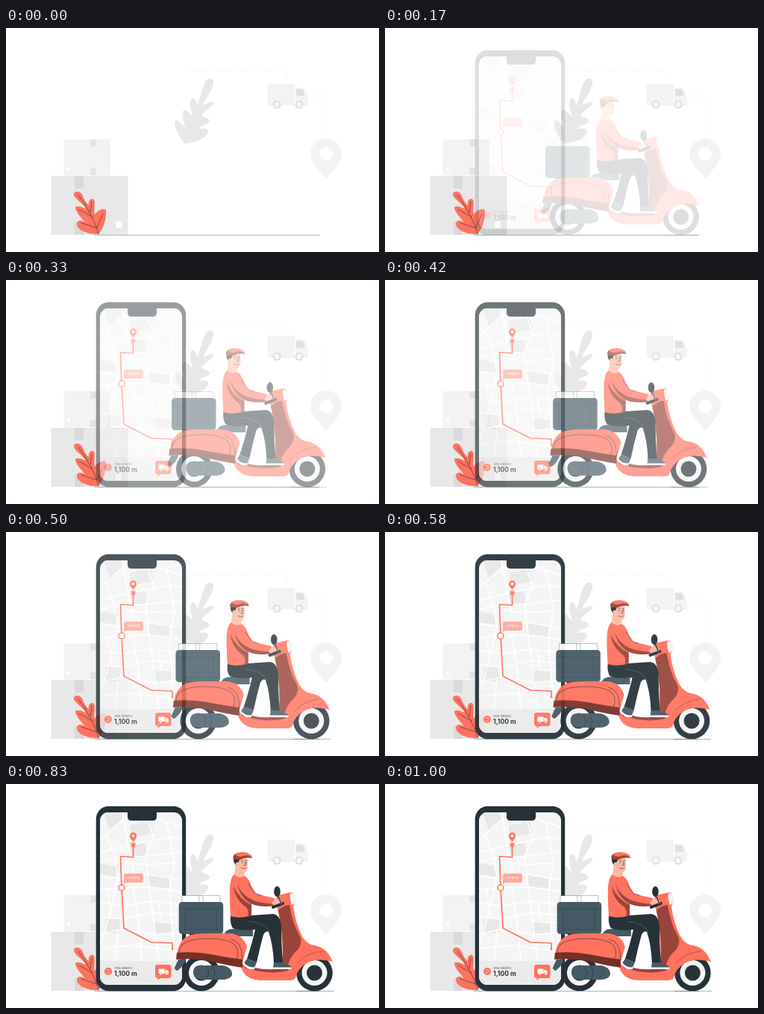
An HTML page that plays this animation: 500x300 px, repeating every 1040 ms.

```html
<!DOCTYPE html>
<html lang="en">
<head>
<meta charset="utf-8">
<title>Delivery scooter</title>
<style>
  html, body { margin: 0; width: 100%; height: 100%; overflow: hidden; background: #fff; }
  svg { display: block; width: 500px; height: 300px; }
  text { font-family: Inter, "Open Sans", sans-serif; }
  .red { fill: #ff725e; }
  .shade { fill: #99443a; }
  .dark { fill: #263238; }
  .slate { fill: #455a64; }
  .skin { fill: #ffb9a3; }
  .white { fill: #fff; }
  .line { fill: none; stroke: #263238; stroke-width: .6; stroke-linecap: round; }
  .road { fill: none; stroke: #fff; stroke-width: 1.7; }
</style>
</head>
<body>
<svg viewBox="0 0 500 300">
  <defs>
    <clipPath id="screen"><rect x="126" y="38" width="110" height="231" rx="11"/></clipPath>
    <g id="wheel">
      <circle r="24.3" class="dark"/>
      <circle r="17" fill="#f5f5f5"/>
      <circle r="10.5" class="dark"/>
    </g>
    <g id="tyre">
      <circle r="5.6" fill="#e0e0e0"/>
      <circle r="3.4" fill="#f7f7f7"/>
    </g>
  </defs>

  <!-- backdrop -->
  <path fill="none" stroke="#f4f4f4" stroke-dasharray="4 4" d="M242 57.500H377V72M408 91H428V146"/>
  <path fill="#e8e8e8" d="M240 155C232 146 224 130 227 124C231 121 236 130 241 133C237 124 234 112 239 110C244 109 247 116 251 119C247 109 245 95 250 94C254 93 255 99 257 103C261 93 264 72 271 68C277 66 280 70 277 78C274 88 266 96 264 104C268 101 276 97 278 100C280 104 266 110 262 118C266 120 273 121 273 125C272 130 262 129 258 135C264 134 272 134 271 139C268 149 254 153 240 155Z"/>
  <g fill="#f3f3f3">
    <path d="M350.500 74.500H387V104H350.500ZM388 80H398Q401 81 402 86L405 91V104H388Z"/>
    <path fill="#e0e0e0" d="M389 82H397Q400 84 400 91H391Q389 90 389 88Z"/>
    <use href="#tyre" x="363" y="102.500"/>
    <use href="#tyre" x="393" y="102.500"/>
    <path fill-rule="evenodd" d="M429 202C423 193 408 181 408 169A21 21 0 0 1 450 169C450 181 436 193 429 202ZM420 169a9 9 0 0 0 18 0a9 9 0 0 0-18 0"/>
    <rect x="77.500" y="149" width="62.500" height="48.500"/>
  </g>
  <path fill="#e4e4e4" d="M113 149h8v10h-8ZM113 187h8v10h-8Z"/>
  <rect x="82" y="186" width="4" height="5" class="white"/>
  <rect x="60.500" y="198" width="103" height="79" fill="#e8e8e8"/>
  <path fill="#dadada" d="M92 198h12v17H92ZM92 260h12v17H92Z"/>
  <rect x="147" y="259" width="8" height="9" class="white"/>
  <path class="line" stroke-opacity=".65" d="M119 277.400H420"/>
  <path class="red" d="M124 276C111 277 95 271 95 262C95 257 101 257 106 260C101 255 92 244 93 240C95 237 102 240 107 242C103 234 90 228 91 222C92 218 99 218 102 223C104 227 105 232 111 237C110 232 113 228 117 229C121 232 117 243 119 250C122 245 130 240 134 244C135 254 131 268 124 276Z"/>
  <path class="line" d="M124 276C121 262 108 238 97 224M122 268L101 261M116 253L98 243M122 267L130 249M113 247L115 233"/>

  <g id="phone">
    <rect x="120.700" y="29.700" width="120.500" height="247.600" rx="17" class="dark"/>
    <g clip-path="url(#screen)">
      <path fill="#f5f5f5" d="M126 38h110v231H126Z"/>
      <path fill="#e8e8e8" d="M131 38H155L156 48L140 65ZM166 55L194 50L198 66L168 72ZM190 122L219 126V140L192 137ZM134 178L152 181L153 200L131 199ZM196 186L222 184V200L199 201ZM164 83L186 79L190 95L171 98ZM126 106L148 111V124L126 121Z"/>
      <path class="road" d="M126 75L156 48L204 47L236 58M156 38L164 82L171 116M126 92L164 82L219 71L236 74M126 104L153 98L187 97L236 91M190 49L198 72L187 97L192 137L196 168M215 50L220 72L226 106L219 142L224 210M126 123L155 127L190 121L236 129M126 141L155 139L192 138L236 144M135 68L146 100L150 127L132 200L126 214M126 159L156 163L196 157L236 162M126 178L157 181L196 172L236 176M170 138L177 180L182 237M126 201L158 194L199 202L236 198M196 168L200 202L205 237M126 220L171 216L236 224M150 195L147 237M205 160L208 185L236 186M136 141L141 176M160 105L187 108L226 106"/>
      <path fill="#ebebeb" d="M126 237h110v33H126Z"/>
    </g>
    <path class="dark" d="M163 37V44Q163 49 168 49H197Q202 49 202 44V37Z"/>
    <path fill="none" stroke="#ff725e" stroke-width="1.700" stroke-linejoin="round" d="M170.500 82V98L153.500 97L155 139L158 193L195 212L223 213V221"/>
    <circle cx="155" cy="139" r="4" class="white" stroke="#ff725e" stroke-width="1.500"/>
    <circle cx="170.500" cy="81.500" r="3.700" class="red" opacity=".45"/>
    <circle cx="170.500" cy="81.500" r="2.200" class="red"/>
    <circle cx="223" cy="221" r="1.500" class="red"/>
    <path class="red" fill-rule="evenodd" d="M170.500 77.500C169 75 166 73 166 69.500A4.500 4.500 0 0 1 175 69.500C175 73 172 75 170.500 77.500ZM168.400 69.500a2.100 2.100 0 0 0 4.200 0a2.100 2.100 0 0 0-4.200 0"/>
    <path fill="#ffaa9e" d="M160 120H182Q184 120 184 122V130Q184 132 182 132H161L158 134V122Q158 120 160 120Z"/>
    <text x="163" y="127.400" font-size="3.800" class="white">Shipping</text>
    <circle cx="137" cy="251" r="5" class="red"/>
    <path fill="none" stroke="#ffd0c8" stroke-width=".7" d="M134.500 249H138L140 251.500M134.500 253H139"/>
    <text x="145" y="248" font-size="3.700" class="slate">Total distance</text>
    <text x="145" y="257.300" font-size="8.500" font-weight="700" class="dark">1,100 m</text>
    <path class="red" d="M203 242H218.500Q221.500 242 221.500 245V257Q221.500 260 218.500 260H207L203.500 263V260Q200 260 200 257V245Q200 242 203 242Z"/>
    <path class="white" d="M204.500 247.500H212.500V254H204.500ZM213.200 249H216L218 251.500V254H213.200Z"/>
    <g class="white" stroke="#ff725e" stroke-width=".6">
      <circle cx="207.500" cy="254.500" r="1.500"/><circle cx="215.500" cy="254.500" r="1.500"/>
    </g>
  </g>

  <g id="scooter">
    <path class="line" stroke-opacity=".65" d="M390 277.400H439"/>
    <use href="#wheel" x="262" y="253"/>
    <use href="#wheel" x="413.500" y="253"/>
    <path class="slate" d="M231 235L241 234Q239 243 230 250Q226 249 226 246Z"/>
    <!-- engine and exhaust -->
    <path class="slate" d="M258 243H291Q304 246 303 256Q300 262 289 262H262Q251 261 251 252Q251 245 258 243Z"/>
    <path class="line" d="M268 245Q276 253 268 261M277 244Q283 253 277 262"/>

    <!-- parcel box -->
    <path class="white" stroke="#263238" stroke-opacity=".55" stroke-width=".6" d="M236 160V149.500H287V160ZM259 149.500V160M264 149.500V160"/>
    <rect x="231.700" y="158" width="59.500" height="43" rx="4.500" class="slate"/>
    <path class="line" stroke-opacity=".5" d="M232 167H291M240 167V195M282 167V195M236 195H287"/>
    <path class="dark" d="M246 200.500H284V203H246Z"/>

    <!-- floor, shield and front mudguard -->
    <path class="slate" d="M292 203Q294 194 305 194H331V204H292Z"/>
    <path class="red" d="M316 238Q320 250 340 250Q368 252 371 226Q371 196 364 167Q360 155 364 149L382 145Q388 147 388 157L385 164Q388 186 397 204Q403 214 412 216Q430 218 438 238Q417 232 403 240Q390 248 388 260Q386 263 380 263H341Q322 262 316 248Z"/>
    <path class="shade" d="M365 169Q373 162 380 162Q384 187 394 204Q398 213 391 222Q376 236 378 250Q355 256 322 247L318 241Q342 250 360 248Q372 245 371 226Q371 196 365 169Z"/>
    <path class="line" stroke-opacity=".6" d="M391 240Q403 226 424 224"/>
    <path fill="#f3f3f3" d="M381 146Q389 147 389 155Q387 161 383 162Q380 154 381 146Z"/>

    <!-- rear body -->
    <path class="red" d="M229 228Q232 209 245 203Q252 200 270 200H301Q318 202 323 218L317 239Z"/>
    <path class="line" d="M236 215Q246 207 271 207Q301 207 308 217Q313 225 309 234M236 215Q232 221 232 226"/>
    <path fill="#752f27" d="M229 226Q251 224 274 228Q300 233 317 235V246Q296 243 273 237Q250 233 228 235Z"/>
    <path class="line" d="M302 208Q317 211 317 235"/>

    <!-- legs -->
    <path class="dark" d="M301 177L329 176L358 174Q367 175 369 188Q369 214 371 240H359Q358 215 352 198Q348 196 345 202Q340 220 336 239L323 234Q330 213 334 195Q314 197 304 193Q300 187 301 177Z"/>
    <path class="line" style="stroke:#60727a" d="M326 184Q348 185 354 199"/>
    <path class="slate" d="M323 234L336 239L333 246Q325 248 319 240Z"/>
    <path class="white" d="M319 239Q325 247 334 245L333 248Q324 250 318 241Z"/>
    <path class="slate" d="M359 239H371L382 244V246H358Z"/>
    <path class="white" d="M358 245.500H382.500V248H358Z"/>

    <!-- torso and arms -->
    <path class="skin" d="M308 106L320 114L319 125Q312 129 306 122Z"/>
    <path class="red" d="M306 121Q313 128 320 123Q328 128 330 143L329 176Q314 181 301 177Q299.500 153 300 139Q301 125 306 121Z"/>
    <path class="shade" d="M305 137Q313 155 329 162V176L324 178Q327 167 318 162Q307 153 305 137Z"/>
    <path class="red" d="M311 128Q317 121 323 128L335 147L360 153L361 162Q340 165 329 160Q314 150 311 128Z"/>
    <path class="shade" d="M310 133Q315 149 332 156Q346 161 361 160V163Q340 166 328 160Q314 152 310 133Z"/>
    <path class="line" d="M325 134L335 147L342 149"/>
    <path class="skin" d="M360 154Q368 153 370 158Q369 165 361 164L356 160Z"/>

    <!-- head -->
    <path class="skin" d="M309 98H323Q325 107 323.500 114Q321 120 316 119.500Q310 117 308 110Z"/>
    <path class="dark" d="M305.500 98H314L312 104L309 109Q304 106 305.500 98Z"/>
    <circle cx="310" cy="107" r="2.200" class="skin"/>
    <path class="red" d="M304.500 100Q304 92 315 91.300Q324 91 326 94Q329.500 94 329.500 99Q322 97 314 101Z"/>
    <path class="shade" d="M304.500 100Q304 96 307 94Q310 98 316 97Q323 93.500 329.500 98V99.500Q322 97 314 101.500Z"/>
    <path class="line" d="M316.500 104.500V106M322 104.500V106M320 104L321.500 109H319M315.500 112.500Q319 115 322 112.500M315.500 102.800H317.500M321 102.500H323"/>

    <!-- handlebar and mirror -->
    <path fill="none" stroke="#263238" stroke-width="1.400" d="M364 149L369 160"/>
    <ellipse cx="363.500" cy="144" rx="4.300" ry="7" class="dark"/>
    <path fill="none" stroke="#263238" stroke-width="4" stroke-linecap="round" d="M358 165L371 160"/>
    <circle cx="369" cy="160" r="1.500" class="slate"/>
  </g>
</svg>
<script>
  const LOOP = 1040, FADE = 690, PEAK = 832;
  const phone = document.getElementById("phone");
  const scooter = document.getElementById("scooter");

  function draw() {
    const t = performance.now() % LOOP;
    const p = Math.min(t / FADE, 1);
    const alpha = p * p * (3 - 2 * p);
    // Glide right along a parabola, then ease slightly back.
    const x = -3.86e-5 * (t - PEAK) ** 2;
    phone.setAttribute("opacity", alpha);
    scooter.setAttribute("opacity", alpha);
    scooter.setAttribute("transform", `translate(${x} 0)`);
    requestAnimationFrame(draw);
  }
  draw();
</script>
</body>
</html>
```
